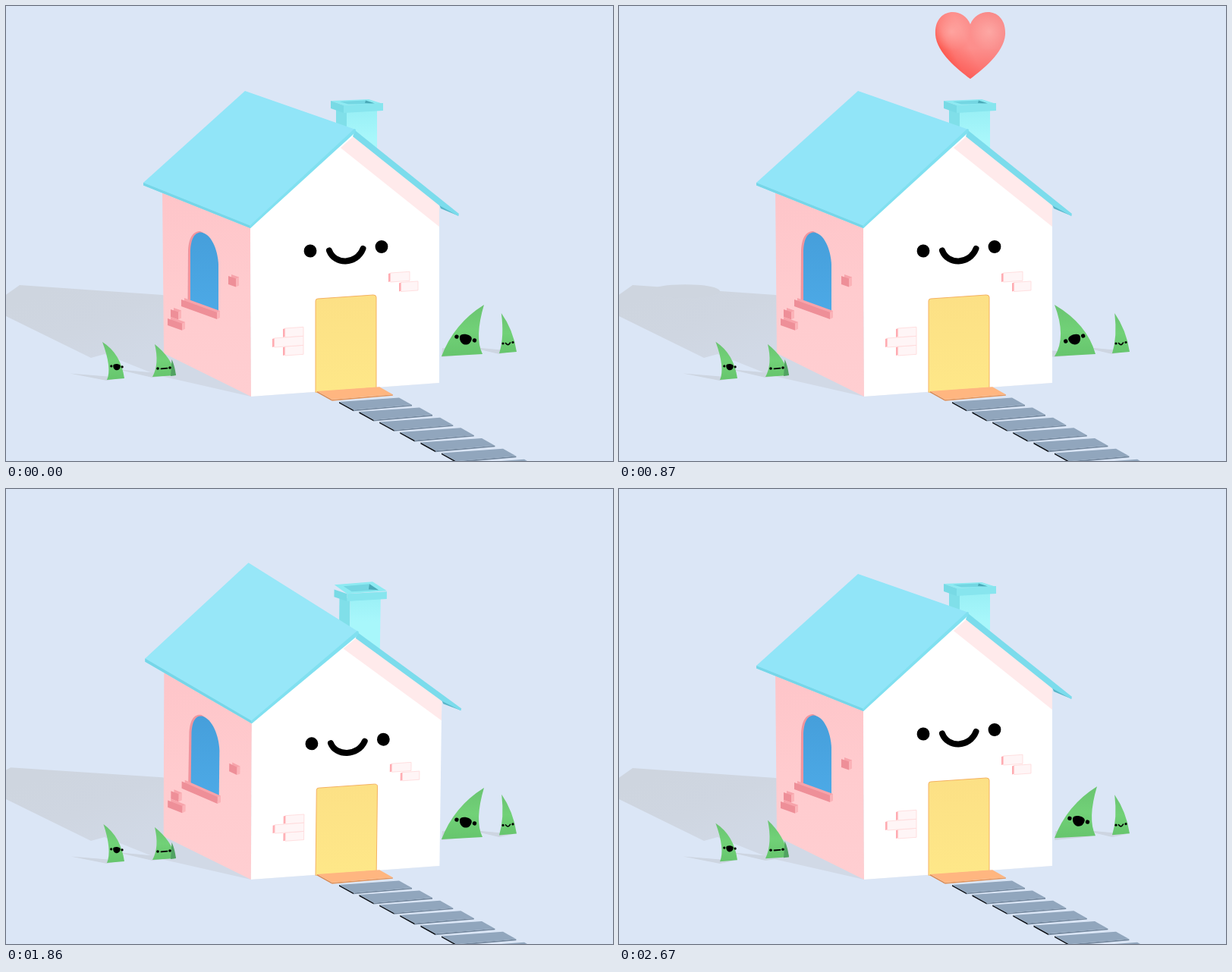
These frames come from a looping animation (800 px wide and 600 px high, 2700 ms). An HTML page with a canvas:

```html
<!DOCTYPE html>
<html lang="en">
<head>
<meta charset="utf-8">
<title>Happy house</title>
<style>
html, body { margin: 0; width: 100%; height: 100%; overflow: hidden; background: #dbe6f6; }
canvas { display: block; width: 800px; height: 600px; }
</style>
</head>
<body>
<canvas id="stage" width="800" height="600"></canvas>
<script>
const ctx = document.getElementById('stage').getContext('2d');
const LOOP = 2700, STEP = 30, LAND = 2385;
const { PI, sin, cos, abs, min, max } = Math;

const mix = (a, b, k) => a + (b - a) * k;
const part01 = (t, a, b) => min(1, max(0, (t - a) / (b - a)));
const ease = (t, a, b) => { const u = part01(t, a, b); return u * u * (3 - 2 * u); };
// Smooth bell: 1 at mid, 0 beyond half a width away.
const pulse = (t, mid, half) => cos(PI / 2 * min(1, abs(t - mid) / half)) ** 2;

// Squash, blow, lean forward, crouch, jump and land.
function poseAt(t) {
  const lean = pulse(t, 1860, 200), land = pulse(t, 2430, 140);
  const squash = .02 * pulse(t, 250, 200) - .028 * pulse(t, 510, 240) + .03 * pulse(t, 2040, 120);
  return {
    lean,
    wide: .85 * squash + .005 * lean + .018 * land,
    front: squash + .073 * lean + .003 * land,
    back: squash - .043 * lean + .039 * land,
    slide: lean - .4 * land,
    lift: -62 * sin(PI * part01(t, 2030, LAND) ** 1.3),
    blink: max(pulse(t, 510, 200), pulse(t, 2430, 90)),
    pout: 1.2 * pulse(t, 540, 200)
  };
}

let pose;

// Moves a point of the resting house into the current pose; depth 0 is back, 1 is front.
function warp(x, y, d) {
  const ground = 515 - .0726 * (x + 115 * (1 - d) - 323) - 57 * (1 - d);
  const h = ground - y, grow = h * (.85 + .0005 * h);
  return [
    x + (x - 389) * pose.wide * (.4 + .0027 * h) + h * pose.slide * mix(.015, .01, d),
    y + grow * mix(pose.back, pose.front, d) + pose.lift
  ];
}

function ramp(x0, y0, x1, y1, ...colors) {
  const g = ctx.createLinearGradient(x0, y0, x1, y1);
  colors.forEach((c, i) => g.addColorStop(i / (colors.length - 1), c));
  return g;
}

function paint(path, fill, stroke, width = 1) {
  const p = new Path2D(path);
  if (fill) { ctx.fillStyle = fill; ctx.fill(p); }
  if (stroke) { ctx.strokeStyle = stroke; ctx.lineWidth = width; ctx.stroke(p); }
}

function part(path, depth, ...style) {
  paint(path.replace(/(-?[\d.]+) (-?[\d.]+)/g, (_, x, y) =>
    warp(+x, +y, depth.call ? depth(+x, +y) : depth).join(' ')), ...style);
}

// Upright face whose top and bottom edges share a slope.
const quad = (x, y, w, h, slope) =>
  `M${x} ${y}L${x + w} ${y + w * slope}L${x + w} ${y + w * slope + h}L${x} ${y + h}Z`;

function dot(x, y, rx, ry = rx) {
  ctx.beginPath();
  ctx.ellipse(x, y, rx, ry, 0, 0, 2 * PI);
  ctx.fill();
}

const side = x => (x - 208) / 115;
const roof = (x, y) => (121 * (x - 315) + 134 * (y - 112)) / 24500;
const rim = (x, y) => .35 + (y - 123) / 40;

function houseShadow(t) {
  const s = .8 * (warp(315, 112, 0)[1] - 112);
  const gx = .85 * pose.lift, gy = .22 * pose.lift;
  const edge = min(0, s - 10);
  paint(`M${18 + s} ${368 + .07 * s}L${edge} ${388 + .5 * s}L${edge} 409L0 409` +
    `L${112 + gx * .3} ${464 + gy * .3}L${130 + gx * .3} ${459 + gy * .3}` +
    `L${200 + gx} ${487 + gy}L${323 + gx} ${515 + gy}L${571 + gx} ${497 + gy}L460 430L206 ${381 + .07 * s}Z`,
    ramp(40, 380, 90, 500, '#ced5df', '#cfd6e1', '#d1d9e6'));
  if (t > 640 && t < 1320) {
    const k = (92 - heartY(t)) / 115;
    ctx.fillStyle = '#ced5df';
    dot(mix(132, 15, k), mix(385, 362, k), 46, 9);
  }
}

function slab(x, y, k, top, edge, left) {
  const at = (a, b) => `${x + a * k} ${y + b * k}`;
  paint(`M${at(19, 10.5)}L${at(96, 4)}L${at(96, 5.6)}L${at(19, 12.3)}Z`, edge);
  paint(`M${at(0, 0)}L${at(19, 10.5)}L${at(19, 12.3)}L${at(0, 1.8)}Z`, left);
  paint(`M${at(0, 0)}L${at(79, -5.6)}L${at(96, 4)}L${at(19, 10.5)}Z`, top);
}

function walkway(t) {
  for (let i = 6; i >= 0; i--) {
    const x = 439 + 26.4 * i + .12 * i * i, y = 522 + 13 * i + .1 * i * i;
    slab(x, y - 10 * pulse(t - 5 * i, 2520, 75), 1 + .005 * i, '#91a6bd', '#73879d', '#0b0f15');
  }
}

function doormat(t) {
  slab(410, 508 - 7 * pulse(t, 2490, 100), 1.04, '#ffb680', '#e3955c', '#d98850');
}

const heartOut = t => 1 - (1 - part01(t, 300, 600)) ** 2;
const heartY = t => 150 - 58 * heartOut(t) - 115 * (max(0, t - 600) / 600) ** 1.2;

function heart(t) {
  if (t < 320 || t > 1400) return;
  const q = 1 - ease(t, 600, 720), k = mix(.25, 1, heartOut(t));
  const m = (a, b) => mix(a, b, q), top = m(-24, -20);
  const half = s => `C${10 * s} ${m(-48, -38)} ${m(48, 46) * s} ${m(-46, -36)} ${46 * s} ${m(-10, -6)}` +
    `C${m(44, 46) * s} ${m(14, 22)} ${m(16, 26) * s} ${m(36, 30)} 0 ${m(48, 31)}`;
  const p = new Path2D(`M0 ${top}${half(1)}L0 ${top}${half(-1)}Z`);
  ctx.save();
  ctx.translate(463, heartY(t));
  ctx.scale(k, k);
  ctx.clip(p);
  ctx.fillStyle = ramp(-40, 26, 38, -14, '#fc4639', '#fd7a75', '#fd8f8c', '#fb8f8d', '#f98a89');
  ctx.fillRect(-60, -60, 120, 120);
  for (const x of [-25, 25]) {
    const g = ctx.createRadialGradient(x, -14, 0, x, -14, 25);
    g.addColorStop(0, 'rgba(255,185,180,.6)');
    g.addColorStop(1, 'rgba(255,185,180,0)');
    ctx.fillStyle = g;
    ctx.fillRect(-60, -60, 120, 120);
  }
  ctx.fillStyle = ramp(0, 8, 0, m(48, 31), 'rgba(250,65,60,0)', 'rgba(250,65,60,.5)');
  ctx.fillRect(-60, 0, 120, 60);
  ctx.restore();
}

function chimney(t) {
  part('M428 125L478 123L497 129L445 131Z', rim, '#8deaf2');
  part('M440 126L474 124.5L486 128.5L451 129.5Z', rim, '#74d6e2');
  part('M474 124.5L486 128.5L473 128Z', rim, '#4aa9b8');
  heart(t);
  part(quad(435, 134, 14, 50, .28), .55, '#80dfe9');
  part(quad(449, 138, 40, 70, -.05), .55, ramp(0, 135, 0, 175, '#98eff5', '#a8f7fb'));
  part(quad(428, 125, 17, 10, .35), .55, '#78dae5');
  part(quad(445, 131, 52, 10, -.06), .55, '#87e5ee');
}

function sideBrick(x, y, w, h) {
  part(quad(x + 4, y - 2, w, h, .36), side, '#f7a3aa');
  part(quad(x + w, y + w * .36, 4, h, -.5), side, '#fbb3b8');
  part(quad(x, y, w, h, .36), side, '#ee8f98');
}

function frontBrick(x, y, w) {
  part(quad(x, y + 1, 3, 11, -.3), 1, '#ffabb1');
  part(quad(x + 3, y, w - 3, 12, -.07), 1, '#fff5f6', '#ffd8da', .8);
}

function windowPane() {
  part('M239.5 390L240 322C241 303 248 297 256 297L260 299L246 390Z', side, '#f0959e');
  part('M243 392L243 322C244 304 250 298.5 257 298.5C270 300 279 320 280 341L280 408Z', side,
    ramp(0, 300, 0, 400, '#469fdb', '#4ca9e6'));
  sideBrick(231, 387, 47, 9);
}

function face() {
  const h = 17 - 12 * pose.blink, m = pose.pout;
  ctx.fillStyle = '#000';
  for (const [x, y] of [[401, 323], [495, 317.5]]) {
    ctx.save();
    ctx.translate(...warp(x, y, 1));
    ctx.rotate(-.06);
    ctx.beginPath();
    ctx.roundRect(-8.4, -h / 2, 16.8, h, h / 2);
    ctx.fill();
    ctx.restore();
  }
  part(`M${426 + 3 * m} ${322.5 + 4 * m}C${433 + 4 * m} ${341.5 - 4 * m} ${462 - 2 * m} ${341.5 - 5 * m} ` +
    `${470.5 - 5 * m} ${320 + 5 * m}`, 1, null, '#000', 8 + 2 * m);
}

function house(t) {
  chimney(t);
  part('M206 240L322 288L323 515L208 458Z', side, ramp(0, 245, 0, 510, '#fec5c9', '#ffcbce', '#ffced1'));
  part('M322 290L459 168L571 260L571 497L323 515Z', 1, '#fff');
  part('M441 187L460 170L571 262L571 291Z', 1, '#ffeaeb');
  windowPane();
  sideBrick(293, 356, 10, 11);
  sideBrick(217, 400, 10, 10);
  sideBrick(213, 412, 19, 9);
  frontBrick(504, 352, 28);
  frontBrick(518, 364.5, 25);
  frontBrick(365, 425, 27);
  frontBrick(365, 449, 27);
  frontBrick(351, 438, 41);
  part('M408 509L408 389Q408 386 411 386L484 381Q488 381 488 384L488 503Z', 1,
    ramp(0, 380, 0, 505, '#fce085', '#fee788'), '#f5b263');
  face();

  part('M571 262L573 267L597 277L590 271Z', 1, '#58b5c8');
  part('M460 164L597 274L596 277L571 263L457 172Z', 1, '#7bdcec');
  part('M181 233L315 112L461 163L322 293L181 236.5Z', roof, `hsl(191 88% ${77 + 1.3 * pose.lean}%)`);
  part('M181 233L321.5 289.5L322 293L181 236.5Z', roof, '#76d6e8');
  part('M321.5 289.5L459 162L461 163L460 167L322 293Z', roof, '#80e0f0');
}

// Decaying bounce of everything on the ground after the landing.
function thump(t) {
  const n = max(0, t - LAND);
  return -12 * Math.exp(-n / 150) * abs(sin(PI * n / 190));
}

// Each blade has base corners a and b, a free tip, a hop and a shadow length.
function blades(t) {
  const bounce = thump(t), p = t % 900 / 900;
  const x1 = 127 + 16.67 * (1 - cos(2 * PI * p)), lean1 = x1 - 144.5;
  const tall = sin(PI * max(0, t - 1860) / 570) ** 2;
  const lean3 = 1 - 2 * (ease(t, 60, 600) - ease(t, 1100, 1800)) - .35 * pulse(t, 2430, 140);
  const over = min(1, p * 1.5);
  const sway = p < 2 / 3 ? -cos(PI * over) : cos(PI * (p * 3 - 2));
  const jump = -17 * sin(PI * over) ** 2;
  return [
    { a: [650, 458], b: [673, 456], tip: [661 + 8.2 * sway, 405 + .41 * jump], hop: bounce + jump, reach: 43, mood: smile },
    { a: [574, 462], b: [628, 459], tip: [602 + 28 * lean3, 390 + 4 * lean3 ** 2], hop: bounce, reach: 55,
      mood: () => openMouth(603 + 2.5 * lean3, 439.5, 1, -.05 + .25 * lean3) },
    { a: [133, 493], b: [156, 491], tip: [x1, 436.5 + .021 * lean1 ** 2], hop: bounce, reach: 43,
      mood: () => openMouth(144.7 - .07 * lean1, 476, .6, -.004 * lean1) },
    { a: [193, 489], b: [224, 487], tip: [196, 446 - 8 * tall], hop: bounce, reach: 50, mood: calm }
  ];
}

function bladeShadow({ a: [ax, ay], b: [bx, by], tip: [x], reach }) {
  paint(`M${x - reach} ${ay - .2 * reach}L${bx - 4} ${by - 1}L${ax} ${ay + 1}Z`, '#cdd5e1');
}

function blade({ a: [ax, ay], b: [bx, by], tip: [x, y], hop, mood }) {
  const w = bx - ax, h = ay - y, mid = (ay + y) / 2;
  const bend = (x - (ax + bx) / 2) / w * h * .25;
  ctx.save();
  ctx.translate(0, hop);
  paint(`M${ax} ${ay}Q${ax + .3 * w} ${mid - bend} ${x} ${y}Q${bx - .2 * w} ${mid + bend} ${bx} ${by}Z`,
    ramp(0, y, 0, ay, '#6ac471', '#71d177', '#66c56d'));
  ctx.fillStyle = '#000';
  mood();
  ctx.restore();
}

function openMouth(x, y, k, tilt) {
  ctx.translate(x, y);
  ctx.rotate(tilt);
  ctx.scale(k, k);
  dot(-12, -1, 2.7);
  dot(12, -1, 2.7);
  paint('M-8 -2C-8 -8 8 -8 8 -2C8 10 -7 10 -8 -2Z', '#000');
}

function smile() {
  dot(655, 445, 1.6);
  dot(668, 443.5, 1.6);
  paint('M658.5 444.5Q661.5 449 664.5 444', null, '#000', 1.6);
}

function calm() {
  paint('M217 488L218.5 466Q222.5 475 224 487Z', '#51a262');
  ctx.fillStyle = '#000';
  dot(200, 478, 1.8);
  dot(216, 477, 1.8);
  paint('M204.5 478.3L212.5 477.6', null, '#000', 1.8);
}

function draw(t) {
  pose = poseAt(t);
  const grass = blades(t);
  ctx.lineCap = 'round';
  ctx.fillStyle = '#dbe6f6';
  ctx.fillRect(0, 0, 800, 600);
  houseShadow(t);
  grass.forEach(bladeShadow);
  walkway(t);
  const order = pose.lift < -1 ? [doormat, house] : [house, doormat];
  order.forEach(layer => layer(t));
  grass.forEach(blade);
}

const start = performance.now();
function tick() {
  const t = (performance.now() - start) % LOOP;
  draw(Math.floor(t / STEP) * STEP);
  requestAnimationFrame(tick);
}
tick();
</script>
</body>
</html>
```
